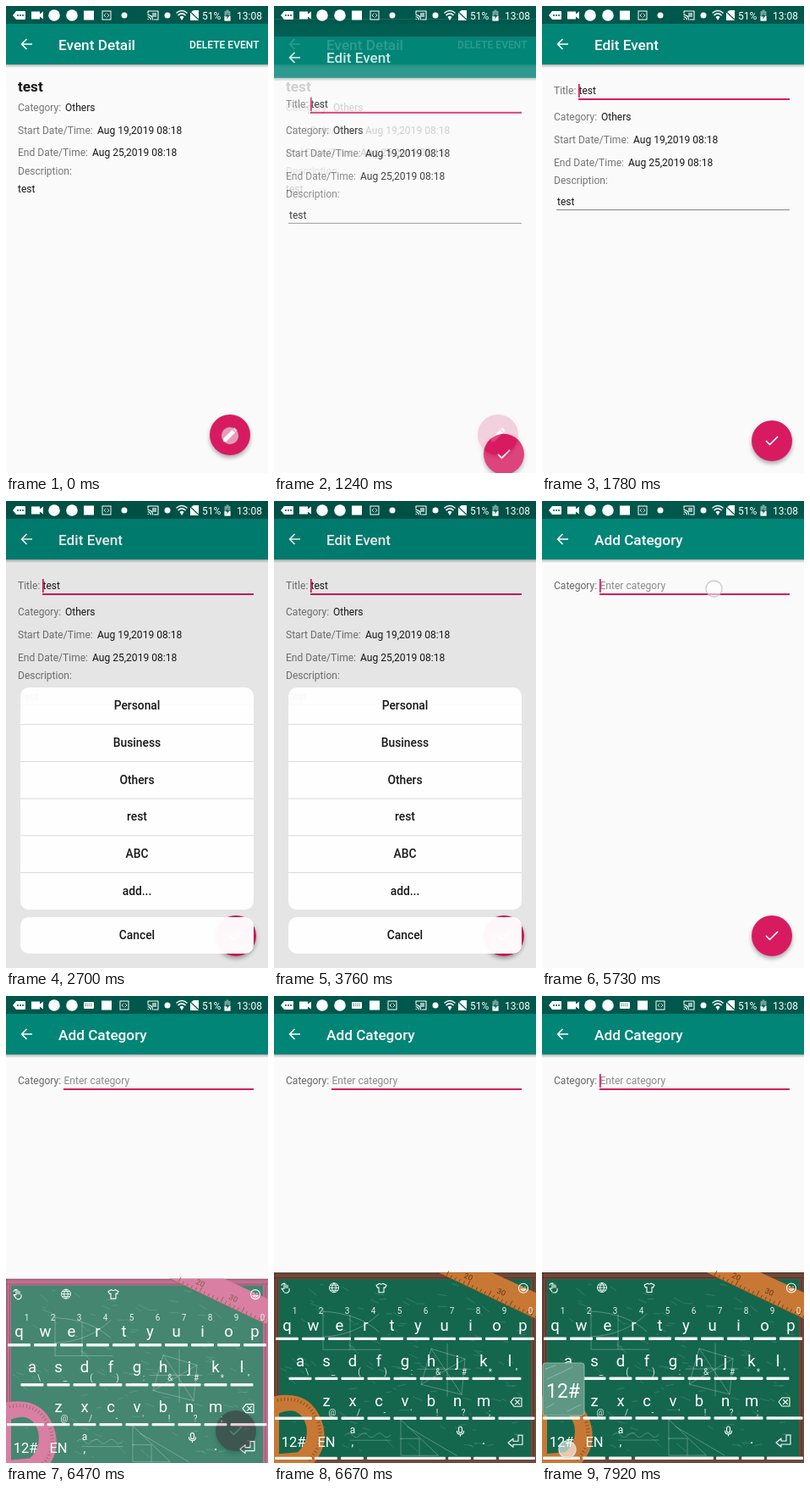
Animation of 310 by 551 pixels, one loop 8000 ms. Source, as an HTML page:

```html
<!DOCTYPE html>
<html lang="en">
<head>
<meta charset="utf-8">
<title>Event editor</title>
<style>
html, body { margin: 0; width: 100%; height: 100%; overflow: hidden; background: #fafafa; }
svg { display: block; width: 100vw; height: 100vh; font-family: Roboto, "Liberation Sans", sans-serif; }
.fab { filter: drop-shadow(0 3px 2.5px rgba(0, 0, 0, .32)); }
.line { fill: none; stroke: #fff; stroke-width: 1.1; stroke-linecap: round; stroke-linejoin: round; }
</style>
</head>
<body>
<svg id="stage" viewBox="0 0 310 551" preserveAspectRatio="none"></svg>
<script>
const LOOP = 8000, W = 310, H = 551;
const PRIMARY = '#008577', DARK = '#00574b', ACCENT = '#d81b60', PAPER = '#fafafa';
const LABEL = '#757575', INK = '#181818';

// Markup helpers; text is placed by the middle of its capitals.
const text = (x, y, s, { size = 12.06, fill = INK, weight = 400, anchor = 'start', extra = '' } = {}) =>
  `<text x="${x}" y="${y + size * .355}" font-size="${size}" fill="${fill}" font-weight="${weight}" text-anchor="${anchor}" ${extra}>${s}</text>`;
const rect = (x, y, w, h, fill, extra = '') =>
  `<rect x="${x}" y="${y}" width="${w}" height="${h}" fill="${fill}" ${extra}/>`;
const circle = (x, y, r, fill, extra = '') => `<circle cx="${x}" cy="${y}" r="${r}" fill="${fill}" ${extra}/>`;
const line = (d, extra = '') => `<path class="line" d="${d}" ${extra}/>`;
const group = (id, body, extra = '') => `<g id="${id}" ${extra}>${body}</g>`;
const at = (x, y, body) => `<g transform="translate(${x} ${y})">${body}</g>`;

const field = (y, label, x, value) => text(14, y, label, { fill: LABEL }) + text(x, y, value);
const touch = (id, x, y) =>
  circle(x, y, 9.5, '#fff', `id="${id}" fill-opacity=".55" stroke="#bbb" stroke-opacity=".75" stroke-width="1.3"`);

function screen(id, title, body) {
  const arrow = line('M31 45H19M24.5 39L18.5 45L24.5 51', 'style="stroke-width:1.7;stroke-linecap:butt"');
  return group(id, rect(0, 0, W, H + 50, PAPER) + rect(0, 69, W, 4, 'url(#shade)') +
    rect(0, 0, W, 21, DARK) + rect(0, 21, W, 48, PRIMARY) + arrow +
    text(62, 45.5, title, { size: 17.2, weight: 500, fill: '#fff' }) + body);
}

const fab = (x, y, icon) => at(x, y, circle(0, 0, 24, ACCENT, 'class="fab"') + icon);
const check = line('M-7 0L-2.5 4.5L7 -5', 'style="stroke-width:1.7;stroke-linecap:butt"');
const pencil = '<path d="M-8 8V4.5L2.5 -6L6 -2.5L-4.5 8ZM3.5 -7L5.3 -8.6L8.6 -5.3L7 -3.5Z" fill="#fff"/>';

const detail = screen('detail', 'Event Detail',
  text(299.5, 45.5, 'DELETE EVENT', { weight: 500, fill: '#fff', anchor: 'end' }) +
  text(14, 95, 'test', { size: 17.2, weight: 700 }) +
  field(120, 'Category:', 70, 'Others') +
  field(146.5, 'Start Date/Time:', 108, 'Aug 19,2019 08:18') +
  field(173, 'End Date/Time:', 102, 'Aug 25,2019 08:18') +
  field(195, 'Description:', 14, '') + text(14, 216, 'test') +
  fab(265, 506, pencil) + touch('tapEdit', 265, 507));

const edit = screen('edit', 'Edit Event',
  field(100, 'Title:', 43.5, 'test') + rect(43, 109, 250, 2, ACCENT) +
  rect(43, 92, 1.7, 16, ACCENT, 'id="titleCaret"') +
  field(131, 'Category:', 70, 'Others') +
  field(158, 'Start Date/Time:', 108, 'Aug 19,2019 08:18') +
  field(184.5, 'End Date/Time:', 102, 'Aug 25,2019 08:18') +
  field(206, 'Description:', 18, '') + text(18, 231, 'test') +
  rect(17, 240, 276, 1, '#858585') + fab(272, 513, check));

const add = screen('add', 'Add Category',
  text(14, 100, 'Category:', { fill: '#666' }) + text(68.5, 100, 'Enter category', { fill: '#8a8a8a' }) +
  rect(68, 109, 225, 2, ACCENT, 'id="addLine"') +
  rect(68, 92, 1.7, 16, ACCENT, 'id="addCaret"') +
  fab(272, 513, check) + touch('tapField', 203.5, 103.5));

function buildSheet() {
  const row = 43.7, top = 220;
  const option = (s, y) => text(155, y, s, { size: 13.8, weight: 500, anchor: 'middle', fill: '#111' });
  let body = rect(17, top, 276, row * 6, '#fff', 'rx="10"') +
    `<path id="pressed" d="M17 438.5H293V472a10 10 0 0 1 -10 10H27a10 10 0 0 1 -10 -10Z" fill="#e6e6e6"/>`;
  ['Personal', 'Business', 'Others', 'rest', 'ABC', 'add...'].forEach((s, i) => {
    if (i) body += rect(17, top + i * row - .5, 276, 1, '#dadada');
    body += option(s, top + (i + .49) * row);
  });
  body += rect(17, 491, 276, 43, '#fff', 'rx="10"') + option('Cancel', 512.5);
  return group('sheet', body, 'opacity=".97"');
}

function buildStatus() {
  const code = rect(-5, -5, 10, 10, 'none', 'stroke="#fff"') + line('M-1 -2L-3 0L-1 2M1 -2L3 0L1 2', 'style="stroke-width:.8"');
  const square = rect(-6, -5.5, 12, 11, '#fff');
  const keys = rect(-6, -4, 12, 8, '#fff', 'rx="1"') +
    line('M-4 -1.5H4M-4 .5H4', `style="stroke:${DARK};stroke-dasharray:1 1.2;stroke-linecap:butt"`);
  const left =
    at(16, 11, '<path d="M-8 0L-4 -5H6Q7 -5 7 -4V4Q7 5 6 5H-4Z" fill="#fff"/>' +
      [-2, 1, 4].map(x => circle(x, 0, 1, DARK)).join('')) +
    at(37, 11, '<path d="M-7 -4.5H3V-1.5L7 -4.5V4.5L3 1.5V4.5H-7Z" fill="#fff"/>') +
    circle(57, 11, 6.8, '#fff') + circle(78, 11, 6.8, '#fff');
  const right =
    at(174, 11, line('M-6 -2V-5H6V5H1M-6 4.5h.5M-6 1.8Q-3 2 -2.8 5M-6 -.6Q-.8 0 -.5 5') + rect(-1, -3, 5, 5, '#fff', 'opacity=".6"')) +
    circle(191, 11, 3.5, '#fff') +
    at(208, 11, line('M-6 -3Q0 -8 6 -3M-4 -.3Q0 -4 4 -.3', 'style="stroke-width:1.6"') + '<path d="M-2.5 2Q0 -.5 2.5 2L0 6Z" fill="#fff"/>') +
    at(223, 11, '<path d="M-5 -3L-1 -6H5V6H-5Z" fill="#fff"/>' + line('M-6 -5L6 6', `style="stroke:${DARK}"`)) +
    text(232, 11.5, '51%', { fill: '#fff' }) +
    at(262, 11, '<path d="M-3.5 -5H-1.5V-6.5H1.5V-5H3.5V6.5H-3.5Z" fill="#fff" opacity=".45"/>' +
      rect(-3.5, 1, 7, 5.5, '#fff') + '<path d="M1 -3L-2.5 1.5H0L-1 5L2.5 0H0Z" fill="#00574b"/>') +
    text(273, 11.5, '13:08', { fill: '#fff' });
  return left + right +
    group('iconsIdle', at(98, 11, square) + at(119, 11, code) + circle(140, 11, 3.5, '#fff')) +
    group('iconsTyping', at(98, 11, keys) + at(119, 11, square) + at(140, 11, code));
}

function buildKeyboard() {
  let seed = 11;
  const random = () => (seed = seed * 16807 % 2147483647) / 2147483647;
  const chalk = (d, o = .4) => line(d, `style="stroke:#dfeee6;stroke-width:.8;opacity:${o}"`);
  const key = (x, y, s, size = 18.5) => text(x, y, s, { size, fill: '#fff', anchor: 'middle' });
  const hint = (x, y, s) => text(x, y, s, { size: 10, fill: '#e4eee9', anchor: 'middle' });
  const bar = (x, y, w) => rect(x, y, w, 3.4, '#f4f6f5', 'rx="1"');

  let b = rect(0, 326, W, 230, 'var(--wood)') + rect(6, 334, 298, 211, '#14674c');
  b += '<path d="M0 327H310M0 332.5H310M1 326V551M4.5 334V545M307 334V545" stroke="#33211b" stroke-opacity=".5" fill="none"/>';
  let dust = '';
  for (let i = 0; i < 130; i++) {
    const l = 2 + random() * 9;
    dust += `M${(8 + random() * 285).toFixed(1)} ${(337 + random() * 200).toFixed(1)}l${l.toFixed(1)} ${(l * (random() * 1.2 - .2)).toFixed(1)}`;
  }
  b += chalk(dust, .2);
  b += chalk('M58 368V417H126M58 372Q100 374 124 396M58 402Q98 400 124 375M90 376V417');
  b += chalk('M174 458L186 416L226 428L222 470L174 458L226 428M186 416L222 470M205 410V472M170 440H232');
  b += chalk('M150 500V542H194ZM150 522L172 522V542M158 508L216 542');
  b += chalk('M84 518q5 -5 9 0t9 0t9 0t9 0t9 0t9 0M90 524h48', .35);

  // Ruler and protractor lying on the board.
  b += '<path d="M194 326H258L310 350V381Z" fill="var(--gold)"/><path d="M194 326L310 381" stroke="#6b3a18" stroke-opacity=".5"/>';
  let ticks = '';
  for (let i = 0; i < 22; i++) ticks += `M${204 + i * 5} ${330 + i * 2.36}l${i % 5 ? '1.6 -3.2' : '3 -6'}`;
  b += `<path d="${ticks}" stroke="#5f3518" stroke-width=".8"/>`;
  [[230, 331, 20], [269, 349, 30]].forEach(([x, y, n]) => b += text(x, y, n,
    { size: 9, fill: '#5f3518', anchor: 'middle', extra: `transform="rotate(25 ${x} ${y})"` }));
  b += '<path fill-rule="evenodd" d="M0 472Q42 464 56 500Q68 532 42 556H0ZM6 492Q30 482 38 506Q42 526 28 538L6 540Z" fill="var(--gold)"/>';
  b += '<path d="M4 477Q39 470 52 502Q61 530 39 549" fill="none" stroke="#5f3518" stroke-width="4" stroke-dasharray="1 3" opacity=".6"/>';

  // Tool strip.
  b += at(14, 344, line('M-2 5L-5 1L-2 1V-5M0 0V-4M2 0V-3M4 1V4L2 6H-1M-5 -3Q-4 -6 -1 -5'));
  b += at(71, 344, line('M-5.5 0A5.5 5.5 0 1 1 5.5 0A5.5 5.5 0 1 1 -5.5 0H5.5M0 -5.5Q-5 0 0 5.5Q5 0 0 -5.5M-4.5 -3H4.5M-4.5 3H4.5', 'style="stroke-width:.9"'));
  b += at(127, 344, line('M-2 -5Q0 -3 2 -5L6 -3L4.5 0L3 -.5V5.5H-3V-.5L-4.5 0L-6 -3Z'));
  b += at(295, 344.5, circle(0, 0, 5.5, 'none', 'class="line"') + line('M-2 -1.6v.3M2 -1.6v.3M-3 1.2Q0 5 3 1.2Z'));

  [...'qwertyuiop'].forEach((c, i) => {
    const x = 15.5 + 31 * i;
    b += key(x, 388, c) + hint(x + 9, 371.5, (i + 1) % 10) + bar(x - 13.5, 402.5, 27);
  });
  const marks2 = ['\\', '_', '(', ')', ':', '&amp;', '#', '*', '"'];
  [...'asdfghjkl'].forEach((c, i) => {
    const x = 31 + 31 * i;
    b += key(x, 430, c) + hint(x + 8, 443, marks2[i]) + bar(x - 13.5, 449.5, 27);
  });
  const marks3 = ['@', '/', '-', "'", '!', '?', ';'];
  [...'zxcvbnm'].forEach((c, i) => {
    const x = 62 + 31 * i;
    b += key(x, 477, c) + hint(x + 7, 491, marks3[i]) + bar(x - 13.5, 496.3, 27);
  });
  b += bar(1, 496.3, 44) + bar(265.5, 496.3, 43);
  b += at(287, 479, line('M-7 0L-3 -5H6V5H-3ZM-1.5 -2.5L3.5 2.5M3.5 -2.5L-1.5 2.5'));
  b += key(23, 526, '12#', 16.5) + key(62, 526, 'EN', 16.5) + key(93, 512, 'a', 12) + key(93, 526, ',', 14);
  b += at(220.5, 513, rect(-2, -5, 4, 7, 'none', 'rx="2" class="line"') + line('M-4 0Q-4 4 0 4Q4 4 4 0M0 4V6'));
  b += key(248, 522, '.', 18) + at(286, 526, line('M3 -8H8V3H-3V6L-9 1L-3 -4V-1H3Z'));
  [[1, 44], [48, 27], [79, 27], [110, 93], [206, 27], [236, 27], [266, 43]].forEach(([x, w]) => b += bar(x, 543.5, w));

  b += group('popup', rect(1, 433, 49, 62, '#5e9884', 'rx="3" stroke="#a9cdbf" stroke-opacity=".7"') +
    chalk('M4 440l12 -4M6 452l30 -14M30 490l16 -8M5 486l9 -5', .45) + key(25, 466, '12#', 23));
  b += circle(30, 535, 10, '#fff', 'id="tapKey" fill-opacity=".6" stroke="#ddd" stroke-width="1.3"');
  return group('keyboard', b);
}

const stage = document.getElementById('stage');
stage.innerHTML = `<defs><linearGradient id="shade" x2="0" y2="1">
  <stop stop-color="#000" stop-opacity=".28"/><stop offset="1" stop-color="#000" stop-opacity="0"/></linearGradient></defs>` +
  detail + edit + rect(0, 0, W, H, '#000', 'id="dim"') + buildSheet() + add + buildKeyboard() + buildStatus();

const el = id => document.getElementById(id);
const show = (id, on) => el(id).setAttribute('visibility', on ? 'inherit' : 'hidden');
const opacity = (id, v) => el(id).setAttribute('opacity', v);
const shift = (id, y) => el(id).setAttribute('transform', `translate(0 ${y.toFixed(2)})`);
const progress = (t, start, length) => Math.min(1, Math.max(0, (t - start) / length));
const within = (t, a, b) => t >= a && t < b;

const TICKS = [0, 940, 1040, 1140, 1240, 1340, 1440, 1540, 1640, 2190, 2290, 2390, 2490, 2600, 2700,
  3270, 3760, 4270, 4390, 4590, 4690, 4790, 4890, 4990, 5090, 5260, 5730, 5830, 5930,
  6370, 6470, 6570, 6680, 6780, 7270, 7760, 7920];

function openScreen(id, t, start) {
  opacity(id, progress(t, start, 160));
  shift(id, 44 * (1 - progress(t, start, 350)) ** 2.2);
}

function render(time) {
  const t = TICKS.filter(k => k <= time).pop();

  openScreen('edit', t, 1110);
  openScreen('add', t, 4620);
  show('tapEdit', t < 940);
  show('titleCaret', !within(t, 3270, 3760) && t < 4790);

  const rise = progress(t, 2150, 400), fall = progress(t, 4540, 250);
  shift('sheet', 335 * (1 - rise) ** 2 + 331 * fall ** 1.28);
  show('sheet', within(t, 2190, 4990));
  show('pressed', within(t, 4270, 4590));
  opacity('dim', .085 * rise);

  el('addLine').setAttribute('fill', t < 4790 ? '#777' : ACCENT);
  show('addCaret', !within(t, 5090, 5730) && !within(t, 6370, 7270));
  show('tapField', within(t, 5260, 5830));

  const slide = progress(t, 6340, 250), fresh = t < 6570;
  show('keyboard', t >= 6370);
  opacity('keyboard', progress(t, 6340, 165));
  shift('keyboard', 33 * (1 - slide) ** 2);
  el('keyboard').style.setProperty('--wood', fresh ? '#b04a72' : '#70483a');
  el('keyboard').style.setProperty('--gold', fresh ? '#cf5f8c' : '#c87835');
  show('tapKey', t >= 7760);
  show('popup', t >= 7920);
  show('iconsIdle', t < 6370);
  show('iconsTyping', t >= 6370);
}

const start = performance.now();
function loop() {
  render((performance.now() - start) % LOOP);
  requestAnimationFrame(loop);
}
loop();
</script>
</body>
</html>
```
